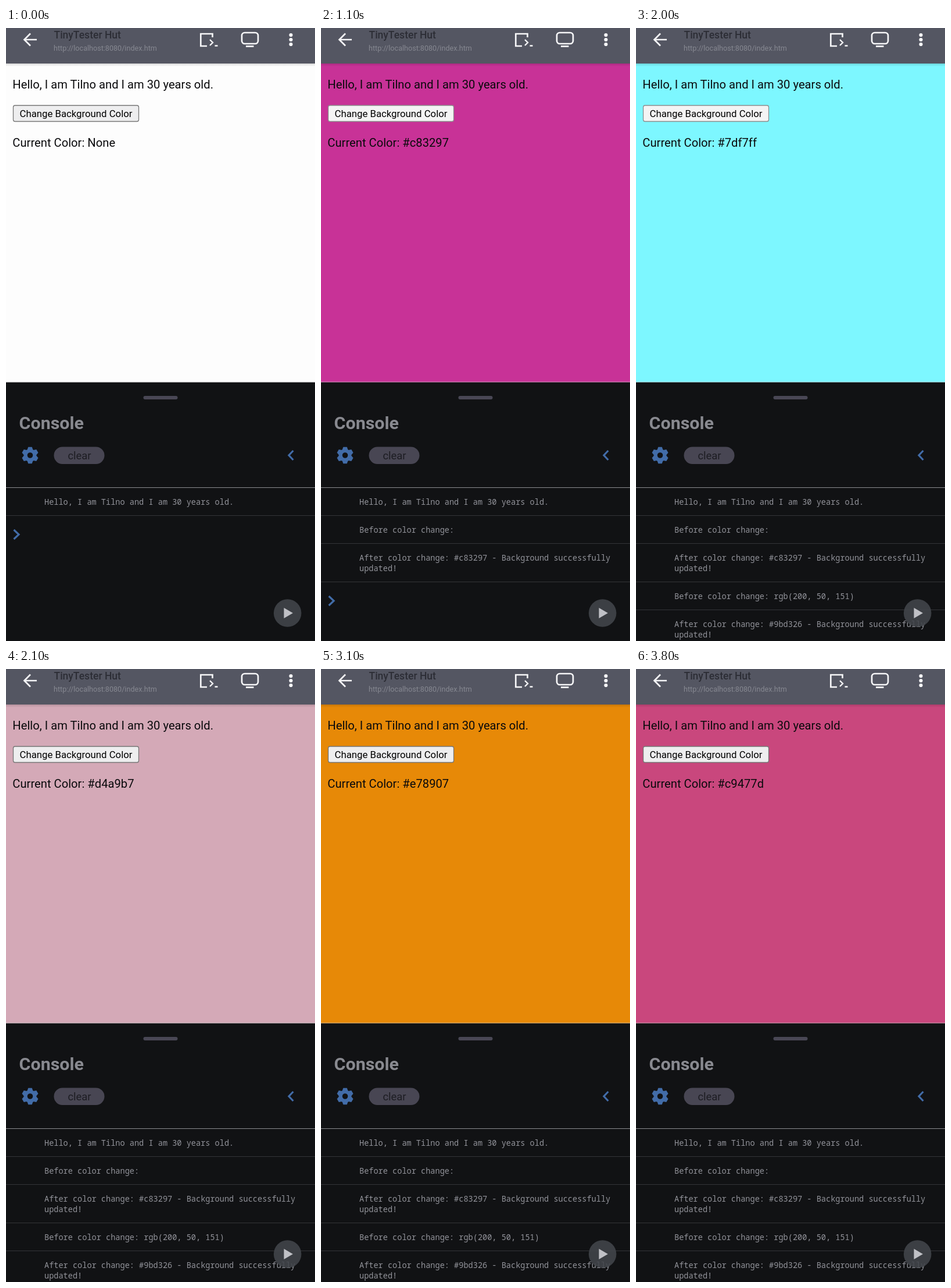
An HTML page that plays this animation: 532x1053 px, repeating every 4700 ms.

```html
<!DOCTYPE html>
<html lang="en">
<head>
<meta charset="utf-8">
<style>
  html, body { margin: 0; height: 100%; overflow: hidden; background: #111214; }
  svg { display: block; width: 532px; height: 1053px; font-family: Roboto, sans-serif; }
  .page { font-size: 20.2px; fill: #0a0a0c; }
  .icon { fill: none; stroke: #f6f6f8; stroke-width: 2.7; }
  .arrow { fill: none; stroke: #426ca8; stroke-width: 3.2; }
  #log text { font: 13.6px "Noto Sans Mono", monospace; fill: #92939a; white-space: pre; }
  #log path { stroke: #343538; }
</style>
</head>
<body>
<svg viewBox="0 0 532 1053">
  <defs>
    <linearGradient id="shade" x2="0" y2="1">
      <stop stop-opacity=".14"/><stop offset="1" stop-opacity="0"/>
    </linearGradient>
  </defs>

  <rect id="page" y="60" width="532" height="549"/>
  <rect y="61" width="532" height="5" fill="url(#shade)"/>
  <g class="page">
    <text x="11.3" y="104">Hello, I am Tilno and I am 30 years old.</text>
    <text id="current" x="11.3" y="204"></text>
  </g>
  <rect id="button" x="12.5" y="133" width="216" height="27.5" rx="3" stroke-width="1.3"/>
  <text x="120.5" y="153" font-size="16.75" text-anchor="middle">Change Background Color</text>

  <rect width="532" height="61" fill="#545662"/>
  <text x="82.5" y="17.5" font-size="17.5" font-weight="500" fill="#2c2d35">TinyTester Hut</text>
  <text x="82" y="39" font-size="12.6" fill="#868891">http://localhost:8080/index.htm</text>
  <g class="icon">
    <path d="M53 20H32M42 9.5L31.5 20L42 30.5"/>
    <path d="M355.5 16V10H335.300V31H346"/>
    <path d="M351 20L356 25L351 30M359.5 30.5H364.5" stroke-width="2.4"/>
    <rect x="406" y="8" width="28" height="19" rx="5"/>
    <path d="M413 31.5H426.5"/>
  </g>
  <g fill="#f6f6f8">
    <circle cx="490.5" cy="12" r="3.1"/>
    <circle cx="490.5" cy="20" r="3.1"/>
    <circle cx="490.5" cy="28" r="3.1"/>
  </g>

  <rect y="608.5" width="532" height="445" fill="#111214"/>
  <path d="M0 608H532" stroke="#d8d8d8" stroke-opacity=".6"/>
  <rect x="236.5" y="632" width="59" height="6" rx="3" fill="#494755"/>
  <text x="22.6" y="689" font-size="30.4" font-weight="700" fill="#898a90">Console</text>
  <g id="gear" transform="translate(41.5 734)" fill="#426ca8">
    <circle r="7.8" fill="none" stroke="#426ca8" stroke-width="6"/>
  </g>
  <rect x="82.5" y="719.5" width="87" height="29.5" rx="14.75" fill="#484653"/>
  <text x="126.5" y="741" font-size="18.4" text-anchor="middle" fill="#1d1d23">clear</text>
  <path class="arrow" d="M494.5 726L487 734L494.5 742"/>
  <path d="M0 789.5H532" stroke="#8b8c90"/>
  <g id="log"></g>
  <path id="prompt" class="arrow" d="M13.5 -8L22 0L13.5 8"/>
  <circle cx="484.7" cy="1005" r="23.8" fill="#42464c" fill-opacity=".88"/>
  <path d="M478.5 996V1014L494 1005Z" fill="#c0c1c6"/>
</svg>

<script>
const LOOP = 4700;
const $ = id => document.getElementById(id);
const states = [
  [0, '#fdfdfd'], [600, '#c83297'], [1200, '#9bd326'], [1700, '#7df7ff'],
  [2100, '#d4a9b7'], [2700, '#e78907'], [3300, '#d8684a'], [3700, '#c9477d']
];

for (let a = 0; a < 360; a += 60)
  $('gear').innerHTML += `<path d="M-5.5 -8L-3.2 -14.3H3.2L5.5 -8Z" transform="rotate(${a})"/>`;

const toRgb = hex =>
  `rgb(${hex.match(/\w\w/g).map(h => parseInt(h, 16)).join(', ')})`;

function logRows(n) {
  const rows = [['Hello, I am Tilno and I am 30 years old.']];
  for (let i = 1; i <= n; i++) {
    rows.push(['Before color change: ' + (i > 1 ? toRgb(states[i - 1][1]) : '')]);
    rows.push([`After color change: ${states[i][1]} - Background successfully`, 'updated!']);
  }
  return rows;
}

function drawLog(n) {
  let y = 789.5, out = '';
  for (const lines of logRows(n)) {
    lines.forEach((s, i) => out += `<text x="66" y="${y + 29 + 18 * i}">${s}</text>`);
    y += 30 + 18 * lines.length;
    out += `<path d="M0 ${y}H532"/>`;
  }
  $('log').innerHTML = out;
  $('prompt').setAttribute('transform', `translate(0 ${y + 32.5})`);
}

let shown = -1;
function draw() {
  const t = performance.now() % LOOP;
  const n = states.filter(s => s[0] <= t).length - 1;
  if (n !== shown) {
    shown = n;
    $('page').setAttribute('fill', states[n][1]);
    $('current').textContent = 'Current Color: ' + (n ? states[n][1] : 'None');
    drawLog(n);
  }
  // the button lights up just before each colour change
  const next = states[n + 1];
  const pressed = next && next[0] - t <= 100;
  $('button').setAttribute('fill', pressed ? '#f4f4f4' : '#eeeeef');
  $('button').setAttribute('stroke', pressed ? '#8d8d8d' : '#767676');
  requestAnimationFrame(draw);
}
draw();
</script>
</body>
</html>
```
